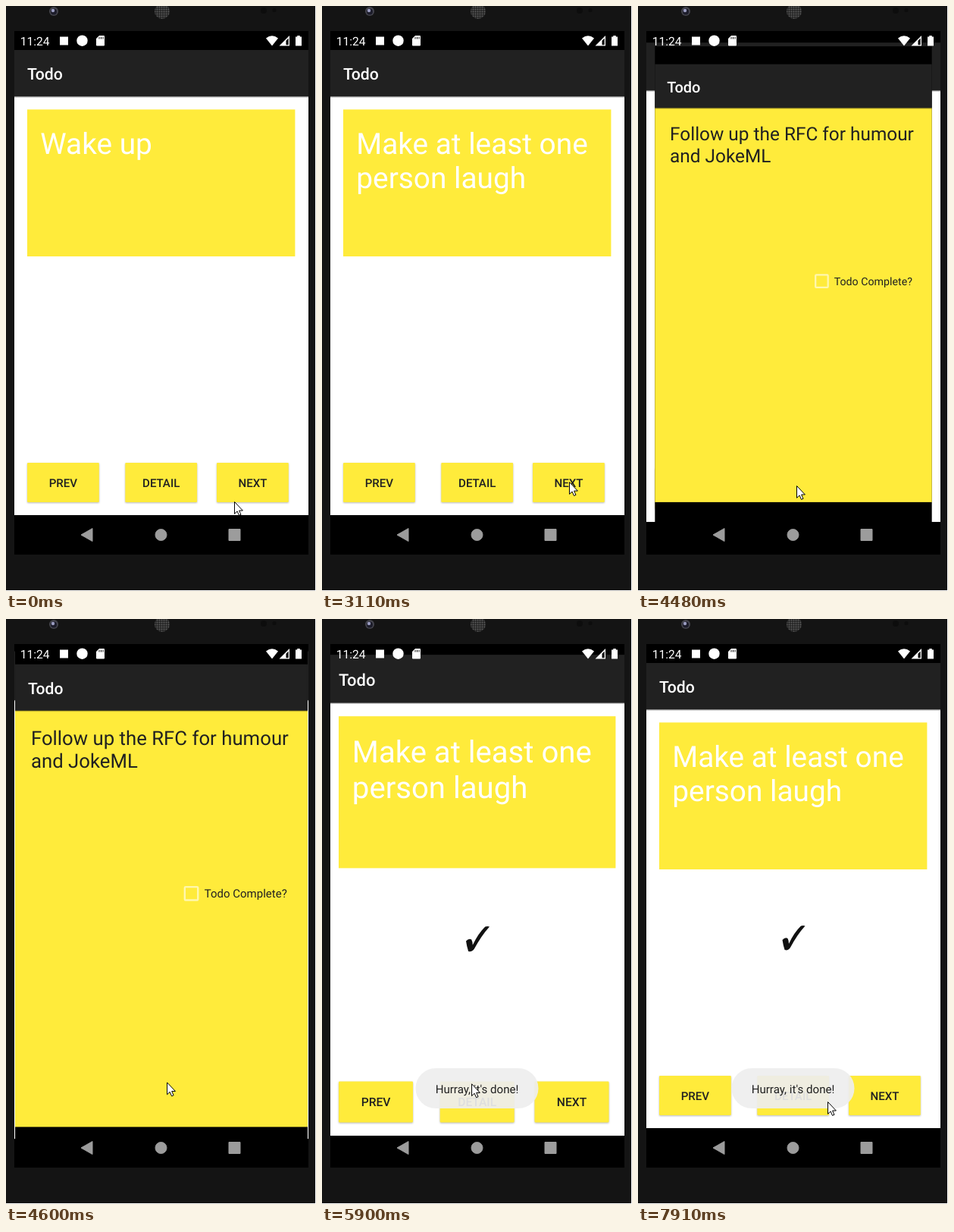
An HTML page that plays this animation: 409x771 px, repeating every 8 s.

```html
<!DOCTYPE html>
<html lang="en">
<head>
<meta charset="utf-8">
<title>Todo</title>
<style>
  html, body { margin: 0; width: 100%; height: 100%; overflow: hidden; background: #fff; }
  svg { display: block; width: 409px; height: 771px; font-family: Roboto, sans-serif; text-rendering: geometricPrecision; }
  .title { font-size: 21.2px; font-weight: 500; fill: #fff; }
  .task { font-size: 38.8px; fill: #fff; }
  .note { font-size: 25.9px; fill: #212121; }
  .label { font-size: 15.1px; fill: #212121; }
  .button text { font-size: 15.1px; font-weight: 500; fill: #212121; text-anchor: middle; }
  .button rect { fill: #ffeb3b; filter: drop-shadow(0 1px 1.2px rgba(0, 0, 0, .28)); }
  .button.pressed rect { filter: drop-shadow(0 2.5px 2px rgba(0, 0, 0, .26)); }
</style>
</head>
<body>
<svg viewBox="0 0 409 771">
  <defs>
    <clipPath id="screen"><rect x="11" y="33" width="388" height="690"/></clipPath>
    <linearGradient id="shade" x2="0" y2="1">
      <stop stop-color="#000" stop-opacity=".4"/>
      <stop offset="1" stop-color="#000" stop-opacity="0"/>
    </linearGradient>
    <pattern id="mesh" width="3" height="3" patternUnits="userSpaceOnUse">
      <circle cx="1.5" cy="1.5" r="1" fill="#5c5c5c"/>
    </pattern>
    <g id="bar">
      <rect x="11" y="58" width="388" height="61.3" fill="#212121"/>
      <rect x="11" y="119.3" width="388" height="2" fill="url(#shade)"/>
      <text class="title" x="28" y="97.4">Todo</text>
    </g>
  </defs>

  <!-- Phone body -->
  <rect width="408" height="770" fill="#141414"/>
  <circle cx="63" cy="7" r="6" fill="#44444c"/>
  <circle cx="63" cy="7.5" r="4" fill="#1c1c2a"/>
  <circle cx="62" cy="6" r="2.2" fill="#9a9cc0"/>
  <circle cx="206" cy="7" r="10" fill="#242424"/>
  <circle cx="206" cy="7" r="10" fill="url(#mesh)"/>
  <circle cx="340" cy="6" r="4" fill="#0d0d0d"/>
  <circle cx="354" cy="5.5" r="2.5" fill="#0d0d0d"/>

  <g clip-path="url(#screen)">
    <rect x="11" y="33" width="388" height="690"/>

    <g id="list">
      <rect x="11" y="119" width="388" height="552" fill="#fff"/>
      <use href="#bar"/>
      <rect x="28" y="136.4" width="353.4" height="193.6" fill="#ffeb3b"/>
      <text class="task" x="45.3" y="195" id="line1"></text>
      <text class="task" x="45.3" y="240.4" id="line2"></text>
      <path id="tick" fill="#111" d="M190.5 423Q194 419 197.5 421Q199 424 199 428Q206 413 215 404.5Q218 403.5 220.5 404.5Q210 416 201 433Q198 437.5 193.5 436Q191.5 430 190.5 423Z"/>
      <g id="buttons"></g>
    </g>

    <g id="page">
      <rect x="11" y="33" width="388" height="690"/>
      <rect x="11" y="119" width="388" height="552" fill="#ffeb3b"/>
      <use href="#bar"/>
      <text class="note" x="32" y="164.9">Follow up the RFC for humour</text>
      <text class="note" x="32" y="195.2">and JokeML</text>
      <circle id="ripple" cx="244.5" cy="362" r="19" fill-opacity=".12"/>
      <rect id="empty" x="236" y="353" width="17.5" height="17.5" rx="1" fill="none" stroke="#fff7ae" stroke-width="2.4"/>
      <g id="full">
        <rect x="235" y="352" width="19.5" height="19.5" rx="2" fill="#78c8c4"/>
        <path d="M239 362l4 4 8-8" fill="none" stroke="#ffeb3b" stroke-width="2.3"/>
      </g>
      <text class="label" x="262" y="367.4">Todo Complete?</text>
    </g>

    <!-- Status bar -->
    <g fill="#fff">
      <text x="18.8" y="51.7" font-size="15.6">11:24</text>
      <rect x="71" y="40.5" width="11" height="11"/>
      <circle cx="100.5" cy="45.7" r="7.2"/>
      <path d="M123 39h6q1 0 1 1v11.5q0 1-1 1h-9q-1 0-1-1V43z"/>
      <path d="M123 41v2.5M125.5 41v2.5M128 41v2.5" stroke="#000"/>
      <path d="M343 42.5Q351 36 359 42.5L351 52.5Z"/>
      <path d="M374 39v13.5h-13.5z"/>
      <path d="M372.7 42.5v8.7h-3.2v-5.5z" fill="#000"/>
      <path d="M382 40.5h2.3V39h3.4v1.5h2.3v12h-8z"/>
    </g>

    <!-- Navigation bar -->
    <g fill="#9c9c9c" stroke="#9c9c9c" stroke-linejoin="round">
      <path d="M99 697l15-8.5v17z"/>
      <circle cx="204.5" cy="697" r="7.5"/>
      <rect x="294" y="689.5" width="15" height="15"/>
    </g>

    <g id="toast">
      <rect x="123.5" y="592" width="162" height="53" rx="26.5" fill="#eee" fill-opacity=".92"/>
      <text class="label" x="204.5" y="624.8" text-anchor="middle">Hurray, it's done!</text>
    </g>
  </g>

  <path id="cursor" d="M.5 .5V16.3L4.1 12.9 6.5 18.4 9 17.3 6.6 12H11.4Z" fill="#fff" stroke="#000"/>
</svg>

<script>
const LOOP = 8000;
const OPEN = 4480, CHECK = 5480, BACK = 5750, CLOSED = 5900;
const $ = id => document.getElementById(id);

const clamp = u => Math.min(1, Math.max(0, u));
const part = (t, from, to) => clamp((t - from) / (to - from));
const smooth = u => u * u * (3 - 2 * u);
const easeOut = u => 1 - (1 - u) ** 3;

// The pointer rests between moves: start, end, goal.
const moves = [
  [50, 760, 328, 627],
  [3080, 3480, 209, 632],
  [OPEN, 5170, 247, 367],
  [CHECK, 5600, 219, 626],
  [BACK, 6260, 115, 561],
  [6260, 6410, 134, 652],
  [6410, 6710, 267, 619],
  [6710, 7220, 109, 606],
  [7220, 7760, 274, 644],
  [7760, 7910, 250, 636]
];

function pointerAt(t) {
  let x = 301, y = 653;
  for (const [from, to, goalX, goalY] of moves) {
    const u = smooth(part(t, from, to));
    x += (goalX - x) * u;
    y += (goalY - y) * u;
  }
  return [x, y];
}

function taskAt(t) {
  if (t < 2000) return ["Wake up", ""];
  if (t < 2990) return ["Drink Coffee", ""];
  return ["Make at least one", "person laugh"];
}

const names = ["PREV", "DETAIL", "NEXT"];
const lefts = [28, 157.3, 278];
$("buttons").innerHTML = names.map((name, i) =>
  `<g class="button"><rect x="${lefts[i]}" y="602" width="94.8" height="52" rx="1"/>` +
  `<text x="${lefts[i] + 47.4}" y="633.5">${name}</text></g>`).join("");
const [, detail, next] = $("buttons").children;

const show = (id, on) => $(id).setAttribute("opacity", Number(on));
const press = (button, on) => button.classList.toggle("pressed", on);
const zoom = (id, s) =>
  $(id).setAttribute("transform", `translate(205 378) scale(${s}) translate(-205 -378)`);

// The list grows as the page opens over it, and shrinks back into place after.
function drawScreens(t) {
  const opened = t < OPEN ? 0 : easeOut(part(t, OPEN - 80, OPEN + 220));
  const settled = t < CLOSED ? 0 : easeOut(part(t, BACK, BACK + 500));
  const leaving = t >= BACK;
  zoom("list", leaving ? 1.1 - .1 * settled : 1 + .05 * opened);
  zoom("page", leaving ? .9975 : .85 + .15 * opened);
  show("page", t >= OPEN && t < CLOSED);
}

function draw(t) {
  $("cursor").setAttribute("transform", `translate(${pointerAt(t)})`);
  [$("line1").textContent, $("line2").textContent] = taskAt(t);
  press(next, t >= 2000 && t < 2120);
  press(detail, t >= 4210 && t < OPEN);
  drawScreens(t);

  const done = t >= CHECK;
  show("empty", !done);
  show("full", done);
  show("ripple", done && t < 5600);
  show("tick", t >= BACK);
  show("toast", part(t, 5560, CLOSED));
}

function tick() {
  draw(performance.now() % LOOP);
  requestAnimationFrame(tick);
}
tick();
</script>
</body>
</html>
```
